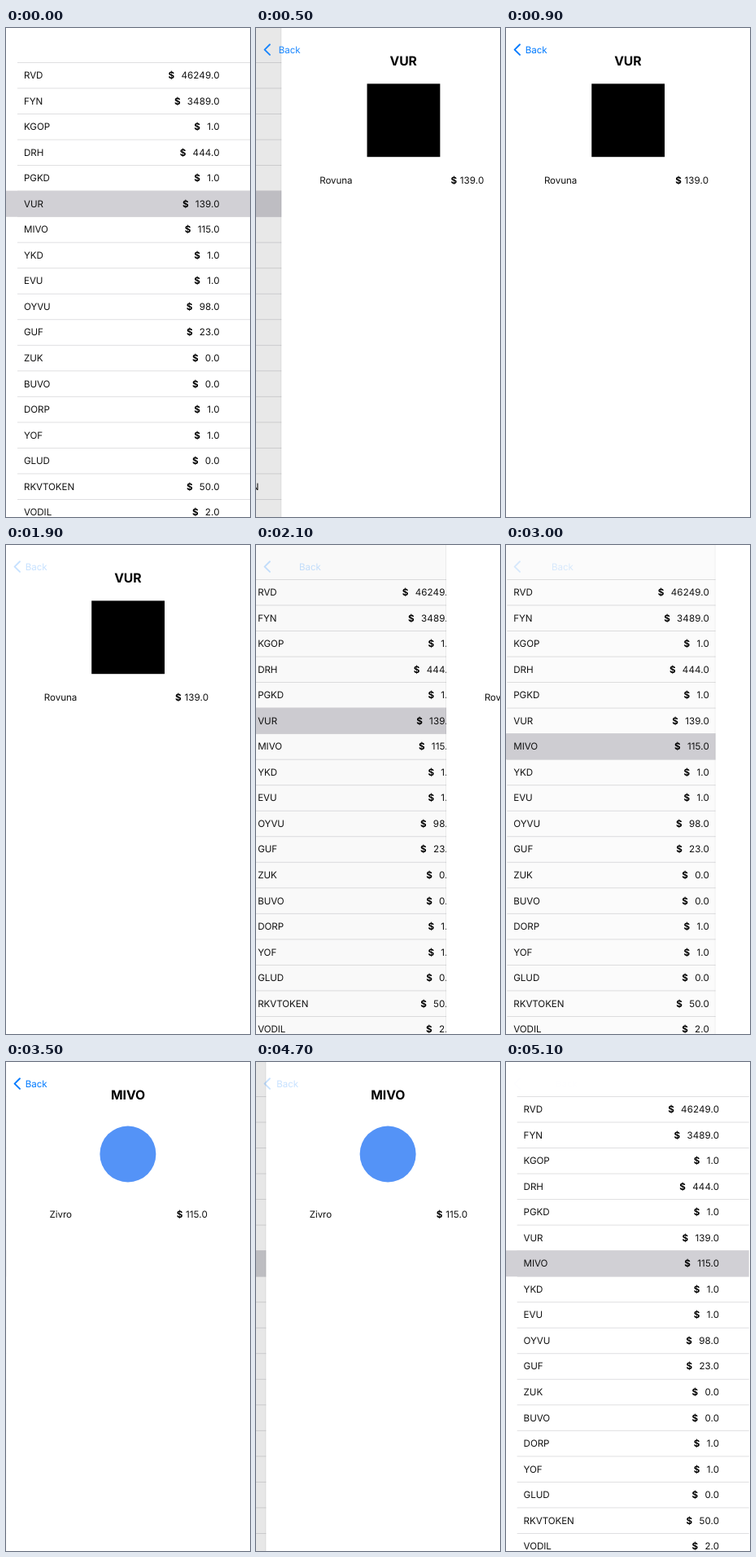
An HTML page for the animation above (5.2 s loop, 300 by 600 pixels).

```html
<!DOCTYPE html>
<html lang="en">
<head>
<meta charset="utf-8">
<title>Price list</title>
<style>
  html, body { margin: 0; width: 100%; height: 100%; overflow: hidden; background: #fff; }
  svg { display: block; }
  text { font: 11.6px Inter, "Liberation Sans", sans-serif; letter-spacing: -.08px; fill: #111; text-rendering: geometricPrecision; }
  .price { letter-spacing: .12px; }
  .mid { text-anchor: middle; }
  .end { text-anchor: end; }
  .title { font-size: 15.7px; font-weight: 700; fill: #000; }
  .bold { font-weight: 700; fill: #000; }
  #back text { fill: #007aff; }
  #back path { fill: none; stroke: #007aff; stroke-width: 1.9; stroke-linecap: round; stroke-linejoin: round; }
</style>
</head>
<body>
<svg width="300" height="600" viewBox="0 0 300 600">
  <g id="list"></g>
  <rect id="dim" width="300" height="600"/>
  <g id="detail">
    <rect id="edge" x="-1" width="1" height="600"/>
    <rect width="300" height="600" fill="#fff"/>
    <g id="page"></g>
  </g>
  <g id="back">
    <path d="M17 20.3 L10.6 26.6 L17 32.9"/>
    <text id="backLabel" y="30.5">Back</text>
  </g>
</svg>
<script>
const LOOP = 5200, STEP = 100, W = 300, TOP = 42, ROW = 31.53;
const coins = [
  ['RVD', 46249], ['FYN', 3489], ['KGOP', 1], ['DRH', 444], ['PGKD', 1], ['VUR', 139],
  ['MIVO', 115], ['YKD', 1], ['EVU', 1], ['OYVU', 98], ['GUF', 23], ['ZUK', 0],
  ['BUVO', 0], ['DORP', 1], ['YOF', 1], ['GLUD', 0], ['RKVTOKEN', 50], ['VODIL', 2]
];
const pages = [
  { row: 5, name: 'Rovuna', icon: '<rect x="105.2" y="68.4" width="89.8" height="89.8"/>' },
  { row: 6, name: 'Zivro', icon: '<circle cx="149.7" cy="113" r="34.5" fill="#5493f7"/>' }
];
const $ = id => document.getElementById(id);

// y is the middle of the capitals
const text = (x, y, cls, body, size = 11.6) =>
  `<text x="${x}" y="${y + size * .3635}" class="${cls}">${body}</text>`;
const price = (value, gap) =>
  `<tspan class="bold">$</tspan> <tspan dx="${gap}">${value.toFixed(1)}</tspan>`;

$('list').innerHTML =
  coins.map((c, i) => `<rect x="14" y="${TOP + i * ROW}" width="286" height=".9" fill="#dcdcde"/>`).join('') +
  `<rect id="pick" width="300" height="${ROW + .6}" fill="#d1d0d5"/>` +
  coins.map(([ticker, value], i) => {
    const y = TOP + (i + .5) * ROW + .2;
    return text(22, y, '', ticker) + text(262.6, y, 'price end', price(value, 4.8));
  }).join('');

function open({ row, name, icon }) {
  const [ticker, value] = coins[row];
  $('pick').setAttribute('y', TOP + row * ROW);
  $('page').innerHTML = text(149.8, 40.6, 'title mid', ticker, 15.7) + icon +
    text(67, 186.6, 'mid', name) + text(228.6, 186.6, 'price mid', price(value, .2));
}

// Critically damped spring from 0 to 1
function spring(ms) {
  const u = Math.max(0, ms) * .01826;
  return 1 - (1 + u) * Math.exp(-u);
}

let current;
function draw(now) {
  const t = Math.floor(now % LOOP / STEP) * STEP;
  const page = pages[t < 3000 ? 0 : 1];
  if (page !== current) open(current = page);

  const shown = spring(t - 290) - spring(t - 1943) + spring(t - 2964) - spring(t - 4682.5);
  const x = W * (1 - shown);
  const pressed = t >= 1900 && t < 2500 || t >= 4700;

  $('list').setAttribute('transform', `translate(${-.3 * W * shown})`);
  $('dim').setAttribute('opacity', .1 * shown);
  $('detail').setAttribute('transform', `translate(${x})`);
  $('edge').setAttribute('opacity', .06 * Math.min(1, (W - x) / 20));
  $('back').setAttribute('opacity', pressed ? Math.min(.22, shown) : shown);
  $('backLabel').setAttribute('x', 23.8 + .125 * x);
  requestAnimationFrame(draw);
}
requestAnimationFrame(draw);
</script>
</body>
</html>
```
